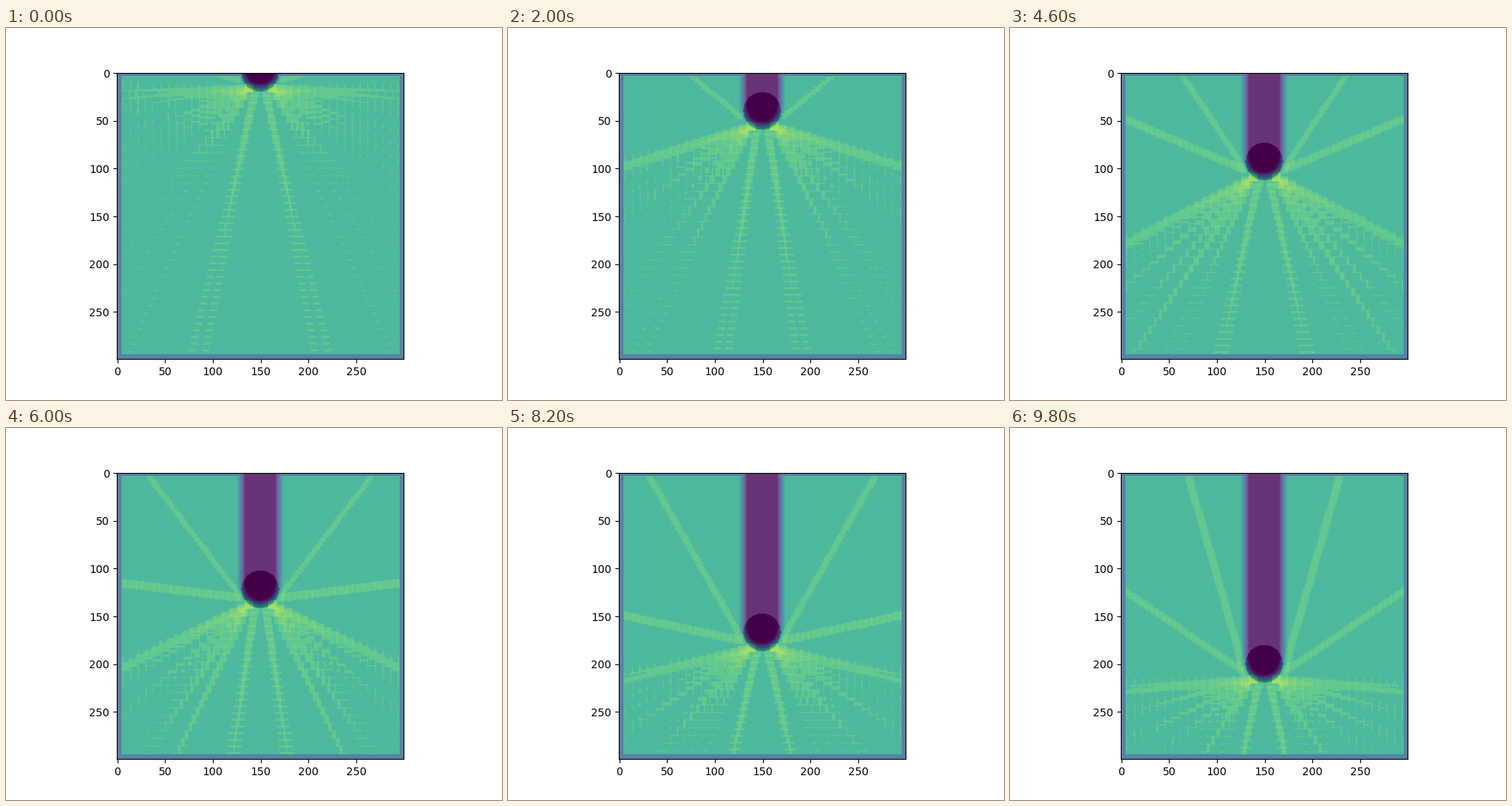
Animation of 640 by 480 pixels, one loop 10000 ms. Source, as a matplotlib script:

```python
import numpy as np
import matplotlib.pyplot as plt
from matplotlib.animation import FuncAnimation

N = 300          # grid side
FRAMES = 50
BOX = 9          # averaging window
R = 19.6         # ball radius
MID = 149.5
BASE = 0.6       # level of undisturbed ground
FAR = 420        # longer than any ray on the grid

rows, cols = np.mgrid[0:N, 0:N]
border = np.ones((N, N))
border[:4] = border[-5:] = 0.52
border[:, :5] = border[:, -4:] = 0.52


def box_sum(a, mode):
    h = BOX // 2
    c = np.pad(np.pad(a, h, mode=mode).cumsum(0).cumsum(1), ((1, 0), (1, 0)))
    return c[BOX:, BOX:] - c[:-BOX, BOX:] - c[BOX:, :-BOX] + c[:-BOX, :-BOX]


def add_ray(grains, x, y, angle, gap):
    """Drop grains along a ray and its mirror image."""
    c, s = np.cos(np.radians(angle)), np.sin(np.radians(angle))
    t = np.arange(0, FAR, gap / max(abs(c), abs(s)))
    gy = np.rint(y + t * s).astype(int)
    for side in (-1, 1):
        gx = np.rint(MID + side * (x + t * c)).astype(int)
        ok = (gx >= 0) & (gx < N) & (gy >= 0) & (gy < N)
        np.add.at(grains, (gy[ok], gx[ok]), 1)


def scatter(i, cy):
    """Overlaps of the windows around all thrown grains."""
    rng = np.random.default_rng(70 + i)
    g = np.zeros((N, N))
    # rays thrown back up and sideways
    add_ray(g, 21, cy + 7, -np.interp(i, [0, 18, 35, 49], [15, 59, 50, 74]), 3.8)
    if i > 12:
        tilt = np.interp(i, [18, 23, 30, 41, 49], [7, 23, 7, 12, 34])
        add_ray(g, 20, cy + 9, -tilt, 3)
    # dashed fan, its top edge dipping halfway down
    top = 24 * np.sin(np.pi * i / (FRAMES - 1))
    fan = np.linspace(top, 66, 12) + rng.uniform(-1.5, 1.5, 12)
    for a in fan:
        add_ray(g, 12, cy + 16, a, BOX - 1)
    # close pairs overlap into tapering spikes
    add_ray(g, 14, cy + 17, fan[0] + 3, BOX - 1)
    steep = rng.uniform(78, 86)
    for a in (steep, steep - 3):
        add_ray(g, 6, cy + 21, a, BOX - 2)
    return np.floor(box_sum(g, "constant") / 2)


def state(i):
    cy = int(200 * i / (FRAMES - 1))
    dug = cy - 4     # the ground gives way one step late
    ball = (cols - MID) ** 2 + (rows - cy) ** 2 <= R * R
    hole = (cols - MID) ** 2 + (rows - dug) ** 2 <= R * R
    hole |= (abs(cols - MID) <= R) & (rows <= dug)
    ground = box_sum(1.0 - hole, "edge") / BOX ** 2
    lift = 0.08 * np.log2(1 + scatter(i, cy))
    lift *= (ground > 0.5) & (border == 1)
    level = BASE * np.minimum(ground, border) + lift
    under = np.ones((N, N, 3))
    under[ball] = (0.27, 0.0, 0.1)
    return under, np.clip(level, 0, 0.98)


fig, ax = plt.subplots(figsize=(6.4, 4.8), dpi=100)
under, level = state(0)
ball_im = ax.imshow(under)
ground_im = ax.imshow(level, cmap="viridis", vmin=0, vmax=1, alpha=0.8)


def draw(i):
    under, level = state(i)
    ball_im.set_data(under)
    ground_im.set_data(level)
    return ball_im, ground_im


anim = FuncAnimation(fig, draw, frames=FRAMES, interval=200, repeat=True,
                     repeat_delay=0)
plt.show()
```
